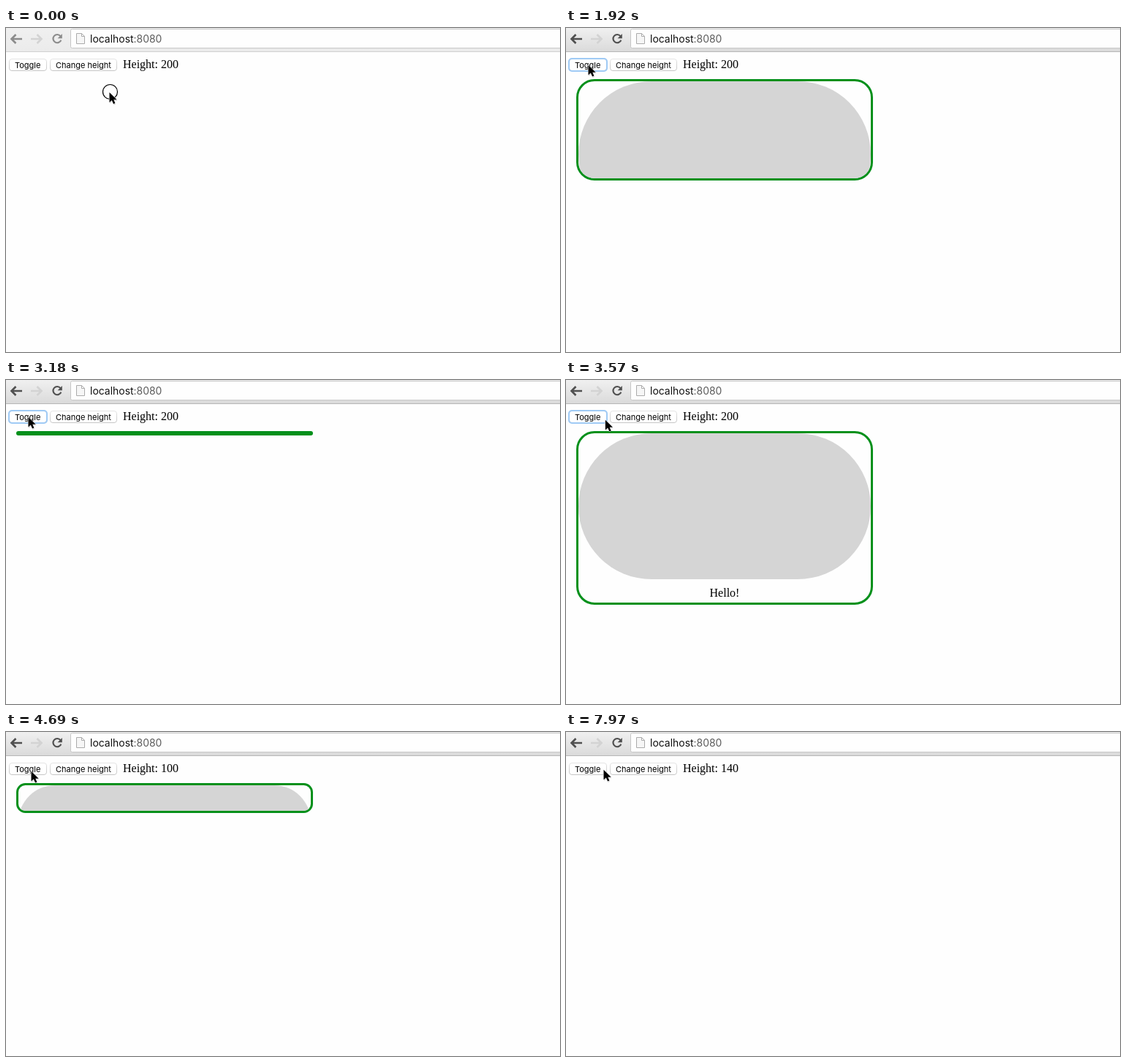
Recreate the animation shown at these times as an HTML page. Size 758 by 444 pixels, loop 8000 ms.

```html
<!DOCTYPE html>
<html lang="en">
<head>
<meta charset="utf-8">
<style>
  html, body { margin: 0; width: 100%; height: 100%; overflow: hidden; background: #fefefe; }
  svg { position: absolute; left: 0; top: 0; }
  .ui { font: 11px Inter, Roboto, sans-serif; }
  .url { font: 13.95px Inter, Roboto, sans-serif; }
  .serif, #box { font: 16px/18px "Liberation Serif", Times, serif; }
  #box { position: absolute; left: 14px; top: 70px; width: 400px; border: 3px solid #04901b; overflow: hidden; }
  #pill { width: 400px; background: #d5d5d5; }
  #hello { position: absolute; width: 100%; text-align: center; }
</style>
</head>
<body>
<div id="box"><div id="pill"></div><div id="hello">Hello!</div></div>
<svg width="758" height="444" viewBox="0 0 758 444">
  <defs>
    <linearGradient id="bar" x2="0" y2="1"><stop stop-color="#f0f0f0"/><stop id="barEnd" offset="1"/></linearGradient>
    <linearGradient id="blue" x2="0" y2="1"><stop stop-color="#55abfa"/><stop offset="1" stop-color="#0b70e6"/></linearGradient>
    <linearGradient id="edge" x2="0" y2="1"><stop stop-color="#e4e4e4"/><stop offset="1" stop-color="#c6c6c6"/></linearGradient>
  </defs>

  <rect width="758" height="33" fill="url(#bar)"/>
  <path id="barLine" d="M0 32.5H758"/>
  <g id="icons" fill="none" stroke-width="2.6">
    <path d="M22 15H8M13.5 9L7.5 15L13.5 21"/>
    <path d="M34 15H48M42.5 9L48.5 15L42.5 21" stroke="#d3d3d3"/>
    <path d="M74.5 11.2A5.6 5.6 0 1 0 75.3 16.6" stroke-width="2.2"/>
    <path id="reloadTip" d="M76.8 8V14.2H70.6Z" stroke="none"/>
  </g>
  <rect x="88.5" y="1.5" width="680" height="26" rx="2" fill="#fefefe" stroke="#c6c6c6"/>
  <path d="M96.5 7.5H103.5L107.5 11.5V21.5H96.5ZM103.5 7.5V11.5H107.5" fill="#f6f6f6" stroke="#ababab"/>
  <text class="url" x="115" y="20" fill="#111">localhost<tspan fill="#5c5c5c">:8080</tspan></text>

  <g class="ui">
    <rect id="toggle" x="4.5" y="42.5" width="51" height="16" rx="3.5"/>
    <rect id="focus" x="4" y="42" width="52" height="17" rx="4" fill="none" stroke="#9fcaf5" stroke-width="2"/>
    <text x="12" y="55">Toggle</text>
    <rect id="change" x="60.5" y="42.5" width="91" height="16" rx="3.5"/>
    <text x="68" y="55">Change height</text>
  </g>
  <text class="serif" id="label" x="160" y="55"></text>

  <g id="cursor">
    <g id="ring" fill="none">
      <circle cx="1.5" r="10" stroke="#fff" stroke-width="3" stroke-opacity=".8"/>
      <circle cx="1.5" r="10" stroke="#000" stroke-width="1.2"/>
    </g>
    <path d="M1 2.5V16L4.2 13L6.4 18L9 17L6.8 12.2H11.4Z" fill="#000" opacity=".18"/>
    <path d="M.5 .8V14.6L3.8 11.6L6 16.6L8.4 15.6L6.3 10.8H10.7Z" stroke="#fff" paint-order="stroke"/>
  </g>
</svg>
<script>
const $ = id => document.getElementById(id);
const LOOP = 8000, PRESS = 62, HIDE = 6150, ACTIVE = 910;

// Moments when a mouse button is let go
const toggles = [1803, 2110, 2537, 2865, 3318, 4541];
const changes = [3993, 5140, 5730, 6620, 6850, 7150, 7390, 7630];
// Pointer moves: from, to, x, y
const moves = [[30, 210, 104, 75], [360, 730, 30, 50], [3380, 3780, 80, 51], [4060, 4380, 34, 53],
  [4800, 5020, 79, 50], [7660, 7850, 74, 45], [7850, 7970, 51, 51]];

const countUntil = (clicks, t) => clicks.filter(c => c <= t).length;
const pressed = (clicks, t) => clicks.some(c => t >= c - PRESS && t < c);
const show = (id, on) => $(id).style.display = on ? '' : 'none';

function heightAt(t) {
  const n = countUntil(changes, t);
  return n === 0 ? 200 : n % 4 === 1 ? 100 : 140;
}

// Inner height the box heads for: the pill plus the greeting, or nothing
const targetAt = t => countUntil(toggles, t) % 2 ? heightAt(t) + 31 : 0;
const events = [...toggles, ...changes].sort((a, b) => a - b);

// Damped spring, stiffness 190 and damping 20, carried across target changes
function springAt(t) {
  const k = 190, a = 10, w = Math.sqrt(k - a * a);
  let x = 0, v = 0;
  events.filter(e => e <= t).forEach((start, i) => {
    const s = (Math.min(t, events[i + 1] || LOOP) - start) / 1000;
    const decay = Math.exp(-a * s), c = Math.cos(w * s), n = Math.sin(w * s) / w;
    const target = targetAt(start), y = x - target;
    x = target + decay * (y * c + (v + a * y) * n);
    v = decay * (v * c - (a * v + k * y) * n);
  });
  return Math.max(0, x);
}

// Eased moves that bow a little to the right of their heading
function pointerAt(t) {
  let x = 141, y = 87.5;
  for (const [from, to, toX, toY] of moves) {
    if (t < from) break;
    const u = Math.min(1, (t - from) / (to - from)), e = u * u * (3 - 2 * u);
    const dx = toX - x;
    x += dx * e;
    y += (toY - y) * e + dx * .07 * Math.sin(Math.PI * u);
  }
  return [x, y];
}

function paintButton(id, down) {
  $(id).setAttribute('fill', down ? 'url(#blue)' : '#fff');
  $(id).setAttribute('stroke', down ? '#2a83e6' : 'url(#edge)');
}

function draw(t) {
  const active = t >= ACTIVE, ink = active ? '#505050' : '#8c8c8c';
  $('barEnd').setAttribute('stop-color', active ? '#dadada' : '#ebebeb');
  $('barLine').setAttribute('stroke', active ? '#b6b6b6' : '#d0d0d0');
  $('icons').setAttribute('stroke', ink);
  $('reloadTip').setAttribute('fill', ink);

  const onToggle = pressed(toggles, t), onChange = pressed(changes, t);
  paintButton('toggle', onToggle);
  paintButton('change', onChange);
  show('focus', t >= toggles[0] - PRESS && t < changes[0] - PRESS);
  show('ring', onToggle || onChange || t < 60 || active && t < 1030);
  $('cursor').setAttribute('transform', `translate(${pointerAt(t)})`);

  const h = heightAt(t);
  $('label').textContent = 'Height: ' + h;
  show('box', t >= toggles[0] && t < HIDE);
  $('box').style.height = Math.round(springAt(t)) + 'px';
  $('box').style.borderRadius = h / 8 + 'px';
  $('pill').style.height = h + 'px';
  $('pill').style.borderRadius = h / 2 + 'px';
  $('hello').style.top = h + 10 + 'px';
}

const begin = performance.now();
function tick() {
  draw((performance.now() - begin) % LOOP);
  requestAnimationFrame(tick);
}
tick();
</script>
</body>
</html>
```
